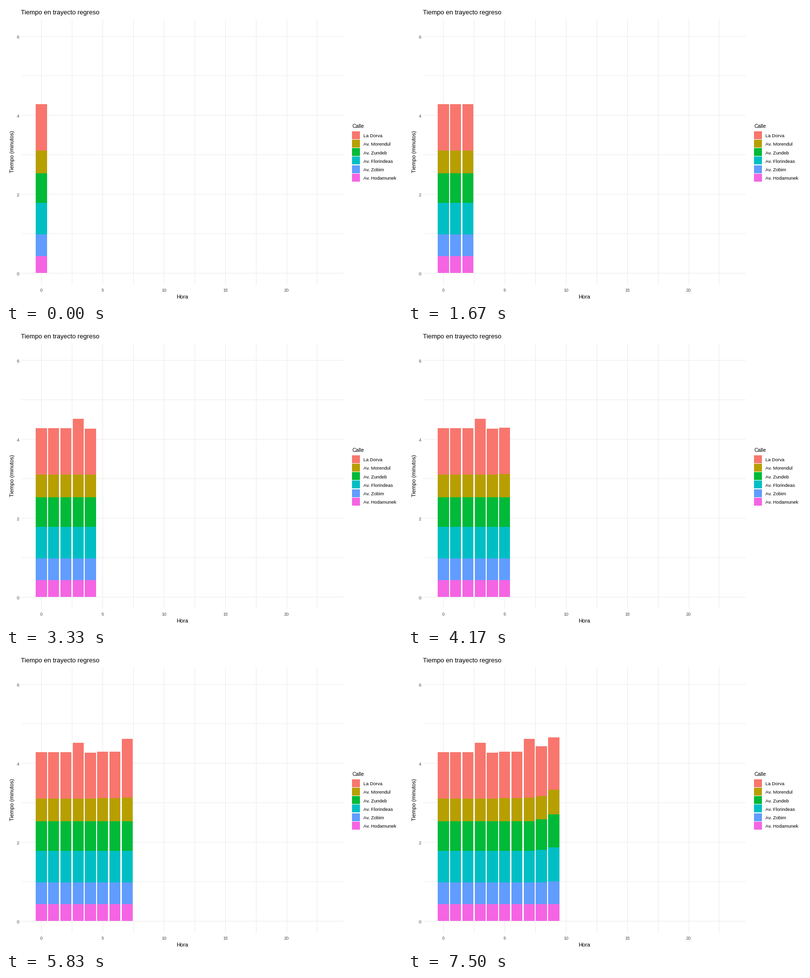
A matplotlib script for the animation above (8000 ms loop, 800 by 600 pixels).

```python
import matplotlib.pyplot as plt
from matplotlib.animation import FuncAnimation
from matplotlib.patches import Rectangle

W, H, DPI = 800, 600, 100
LOOP_MS, INTERVAL = 8000, 25
GRID, TICK = "#EBEBEB", "#4D4D4D"

# Panel edges and data scale in pixels, y pointing down
LEFT, RIGHT, TOP, BOTTOM = 31, 682, 27, 565
X0, X_UNIT = 71.4, 24.78
Y0, Y_UNIT = 541, 80
BAR_HALF = 0.45

STREETS = [
    ("La Dorva", "#F8766D"),
    ("Av. Morendul", "#B79F00"),
    ("Av. Zundeb", "#00BA38"),
    ("Av. Florindeas", "#00BFC4"),
    ("Av. Zobim", "#619CFF"),
    ("Av. Hodamunek", "#F564E3"),
]

# Upper edge of each stacked segment, from top street to bottom street
TOTALS = [199, 199, 199, 180, 200, 198, 198, 172, 187, 169]
USUAL = [293, 339, 399, 463, 507]
SHIFTED = {
    5: [292, 339, 399, 463, 507],
    6: [292, 339, 399, 463, 507],
    7: [291, 339, 399, 463, 507],
    8: [288, 335, 397, 463, 507],
    9: [275, 325, 392, 461, 507],
}

plt.rcParams["font.family"] = "Liberation Sans"
fig = plt.figure(figsize=(W / DPI, H / DPI), dpi=DPI, facecolor="white")
ax = fig.add_axes([0, 0, 1, 1])
ax.set_xlim(0, W)
ax.set_ylim(H, 0)
ax.axis("off")


def box(x1, y1, x2, y2, color, z=1):
    patch = Rectangle((x1, y1), x2 - x1, y2 - y1, facecolor=color,
                      linewidth=0, antialiased=False, zorder=z)
    return ax.add_patch(patch)


def label(x, y, text, px, color="black", **kw):
    ax.text(x, y, text, fontsize=px * 72 / DPI, color=color,
            va="baseline", **kw)


def x_pos(hour):
    return X0 + X_UNIT * hour


def draw_grid():
    for i in range(7):
        y = Y0 - i * Y_UNIT
        box(LEFT, y, RIGHT, y + 1, GRID)
        if i % 2 == 0:
            label(26.5, y + 4.5, str(i), 9, TICK, ha="right")
    for i in range(10):
        x = int(x_pos(2.5 * i))
        box(x, TOP, x + 1, BOTTOM, GRID)
        if i % 2 == 0:
            label(x, 579, str(5 * i // 2), 9, TICK, ha="center")


def draw_legend():
    label(699, 247, "Calle", 10.5)
    for i, (name, color) in enumerate(STREETS):
        y = 253.6 + 17.28 * i
        box(699, round(y), 715, round(y + 16), color)
        label(721.7, round(y + 12.4), name, 9.5)


def make_bar(hour):
    edges = [TOTALS[hour], *SHIFTED.get(hour, USUAL), Y0]
    x1 = round(x_pos(hour - BAR_HALF))
    x2 = round(x_pos(hour + BAR_HALF))
    return [box(x1, y1, x2, y2, color, z=2)
            for (_, color), y1, y2 in zip(STREETS, edges, edges[1:])]


draw_grid()
draw_legend()
label(30.5, 17, "Tiempo en trayecto regreso", 13)
label(356.5, 593, "Hora", 11, ha="center")
label(15.5, 295.5, "Tiempo (minutos)", 11, ha="center",
      rotation=90, rotation_mode="anchor")
bars = [make_bar(hour) for hour in range(len(TOTALS))]


def update(frame):
    # A new hour appears every 2500 / 3 ms
    last = (3 * frame + 2) // 100
    for hour, segments in enumerate(bars):
        for segment in segments:
            segment.set_visible(hour <= last)
    return [segment for segments in bars for segment in segments]


anim = FuncAnimation(fig, update, frames=LOOP_MS // INTERVAL,
                     init_func=lambda: update(0), interval=INTERVAL,
                     repeat=True, repeat_delay=0)
plt.show()
```
